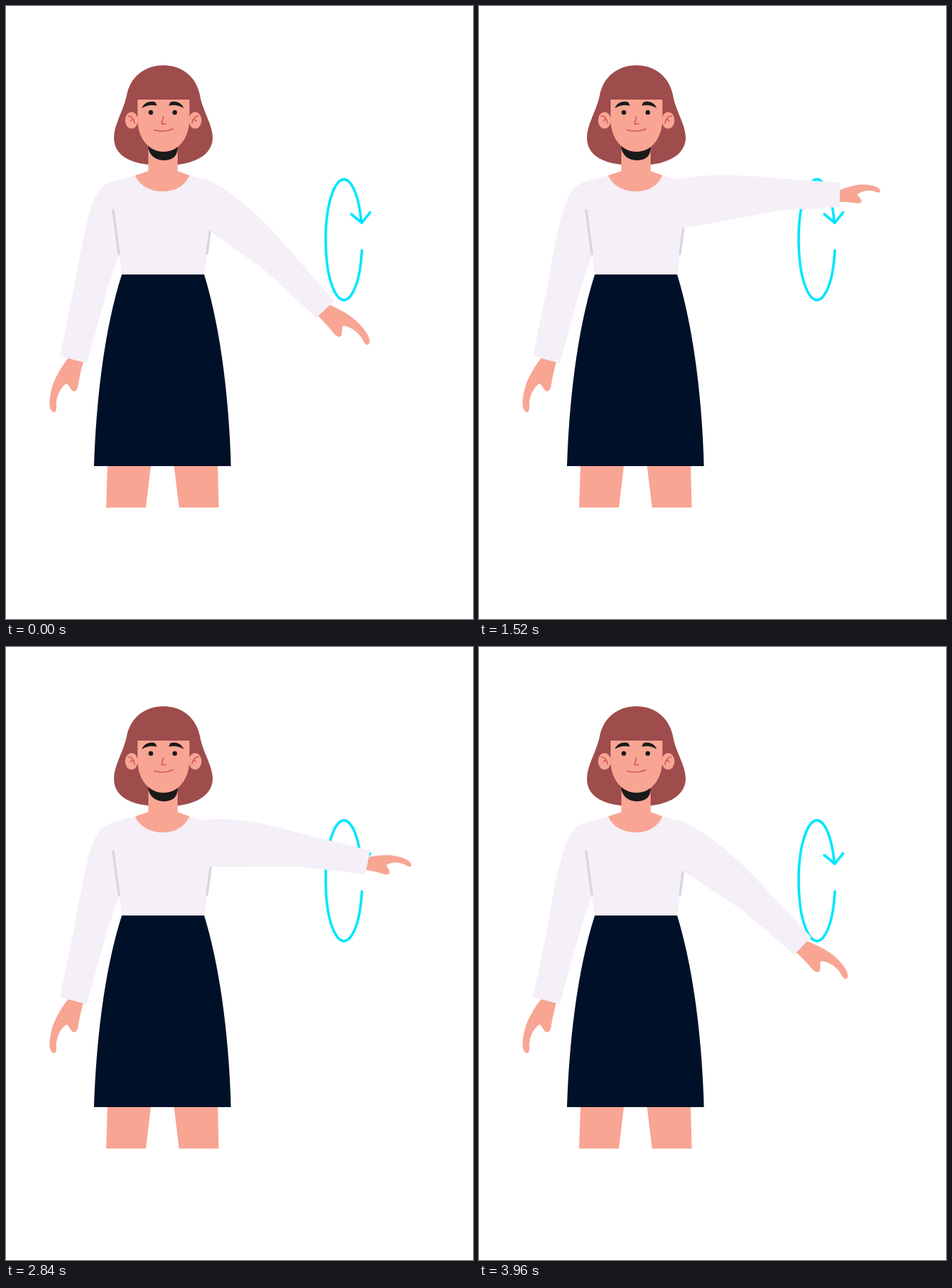
These frames come from a looping animation (653x858 px, 4 s). An HTML page:

```html
<!DOCTYPE html>
<html lang="en">
<head>
<meta charset="utf-8">
<title>Arm raise</title>
<style>
html, body { margin: 0; width: 100%; height: 100%; overflow: hidden; background: #fff; }
svg { display: block; width: 100%; height: 100%; }
.skin { fill: #f8a594; }
.shirt { fill: #f5eff7; }
.dark { fill: #1a1a1a; }
.line { fill: none; stroke-linecap: round; stroke-linejoin: round; }
.seam { stroke: #d9d7dc; stroke-width: 3.4; }
.feature { stroke: #d4535b; stroke-width: 1.5; }
.arrow { stroke: #00e5ff; stroke-width: 3.6; }
</style>
</head>
<body>
<svg viewBox="0 0 653 858">
  <defs>
    <!-- wrist at the origin, fingers along +x -->
    <path id="handShape" class="skin" d="M-3 -8C12 -13 32 -18 48 -16.5S76 -11 77.5 -5S71 -1 67 -3S52 -6 46 -4.5S35 -1 34 1S41 9 41 13S36 18 31 17S14 14 -3 13Z"/>
    <g id="faceSide">
      <ellipse class="skin" cx="175.5" cy="160" rx="9" ry="11.5"/>
      <path class="line feature" d="M171 154Q177 153 180 164M174 161Q178 157 179 160"/>
    </g>
    <g id="eye" class="dark">
      <path d="M190 143C193 134 204 132 209 135L211 139.5C204 138 198 138 190 143Z"/>
      <circle cx="202.5" cy="149" r="3.2"/>
    </g>
  </defs>

  <!-- legs and skirt -->
  <path class="skin" d="M142 640H203L195.5 702H140ZM234.5 640H296L297.5 702H242Z"/>
  <path fill="#001028" d="M162 375.5H277C300 450 312 550 314.5 644H123C126 550 138 450 162 375.5Z"/>

  <!-- head -->
  <path fill="#9e4c4c" d="M220 83C247 83 266 100 271 124C275 148 289 165 289 185C288 208 266 219 240 222H199C172 219 151 208 151 185C151 165 164 148 169 124C174 100 193 83 220 83Z"/>
  <path class="skin" d="M199 190H240V231L257 237V262H181V237L199 231Z"/>
  <path class="dark" d="M199 195V199C201 210 210 216 221 216C232 216 239 211 240 200V195Z"/>
  <use href="#faceSide"/>
  <use href="#faceSide" transform="matrix(-1 0 0 1 440 0)"/>
  <path class="skin" d="M184 131H256.5V158C256.5 186 240 204 220.5 204C200 204 184 186 184 158Z"/>
  <use href="#eye"/>
  <use href="#eye" transform="matrix(-1 0 0 1 438.5 0)"/>
  <path class="line feature" d="M220 155L217.5 165H223.5M207 173.500Q221 177.5 233.5 172"/>

  <!-- torso and resting arm -->
  <use href="#handShape" transform="translate(95 496) rotate(109) scale(1 -1)"/>
  <path class="shirt" d="M180.5 237L148 246C134 250 126 262 120 279C109 312 102 357 96 390L75.5 490L113 500L142 395L158 348L162 375.5H277L281 348L287 306L278 243L256.5 237C250 252 237 259.5 219 259.5C200 259.5 186 250 180.5 237Z"/>
  <path class="line seam" d="M149.8 286L158 347M288.5 290L281 347"/>

  <path class="line arrow" d="M497.6 342A25.5 84.5 0 1 1 496.85 302M483 291.5L497.5 303.5L509 289"/>

  <!-- moving arm -->
  <use id="hand" href="#handShape"/>
  <path id="sleeve" class="shirt"/>
</svg>
<script>
const FRAME = 40, FRAMES = 100, HALF = 50;
const PIVOT = 275;
const sleeve = document.getElementById("sleeve");
const hand = document.getElementById("hand");

// Lift runs from 0 (lowered) to 1 (raised).
function drawArm(lift) {
  const degrees = 41.2 - 57.75 * lift;
  const angle = degrees * Math.PI / 180;
  const cos = Math.cos(angle), sin = Math.sin(angle);
  // Maps a point measured along and across the arm to the stage.
  const at = (x, y) => `${PIVOT + x * cos - y * sin} ${PIVOT + x * sin + y * cos}`;

  // The elbow slides outwards while the forearm and hand foreshorten.
  const slide = Math.sin(lift * Math.PI / 2);
  const swell = Math.sin(lift * Math.PI);
  const sag = lift * lift;
  const reach = 227.5 + 7 * swell - 3 * lift;

  const bulge = at(30 + 35 * lift, -42 - 9.5 * swell + 11 * lift);
  const elbowTop = at(113 + 22 * slide, -33 + 8 * sag);
  const elbowBase = at(127 + 19 * slide, 14 + 7 * sag);
  const armpit = at(33 - 35 * lift, 23.5 + 23 * sag);

  sleeve.setAttribute("d", `M262 246L280 242Q${bulge} ${elbowTop}L${at(reach + 1.5, -17)}` +
    `L${at(reach - 1.5, 17)}L${elbowBase}L${armpit}L262 300Z`);
  hand.setAttribute("transform", `translate(${at(reach, 0)}) rotate(${degrees}) ` +
    `scale(${1 - 0.36 * lift} ${1 - 0.32 * lift})`);
}

function tick() {
  const frame = Math.floor(performance.now() / FRAME) % FRAMES;
  // The raised pose is held for two frames.
  const step = frame <= HALF ? frame : FRAMES + 1 - frame;
  drawArm(step / HALF);
  requestAnimationFrame(tick);
}

tick();
</script>
</body>
</html>
```
